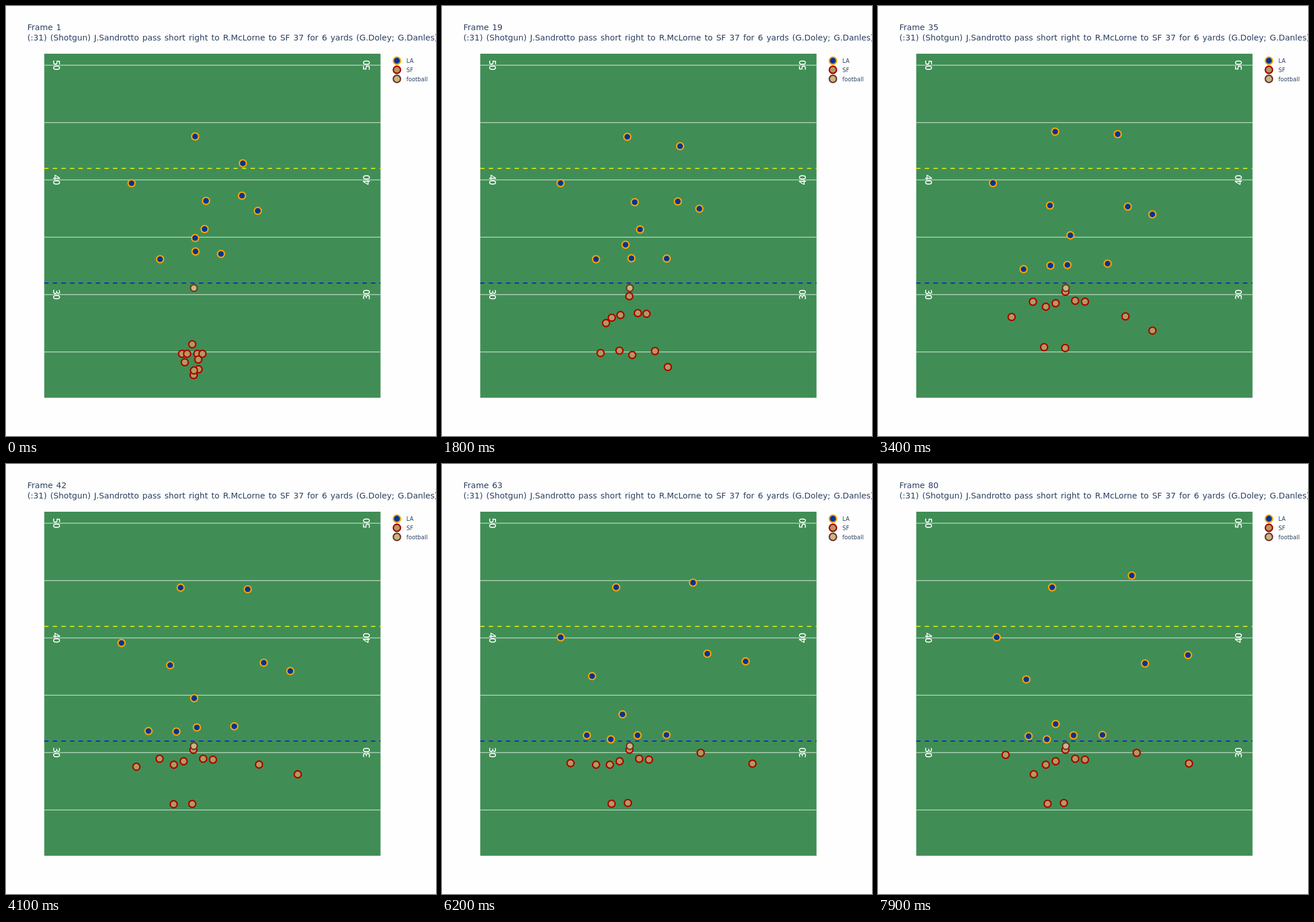
Animation of 748x748 px, one loop 8000 ms. Source, as an HTML page with a canvas:

```html
<!DOCTYPE html>
<html lang="en">
<head>
<meta charset="utf-8">
<title>Play tracking</title>
<style>
  html, body { margin: 0; width: 100%; height: 100%; overflow: hidden; background: #fefefe; }
  canvas { display: block; width: 748px; height: 748px; }
</style>
</head>
<body>
<canvas id="stage"></canvas>
<script>
const SIZE = 748, STEP = 100, STEPS = 80;
const FIELD = { left: 66.5, right: 651.5, top: 83, bottom: 681.5, yard: 19.95 };
const INK = '#2a3f5f';
const SANS = 'Verdana, "DejaVu Sans", sans-serif';
const PLAY = '(:31) (Shotgun) J.Sandrotto pass short right to R.McLorne to SF 37 for 6 yards (G.Doley; G.Danles)';
const TEAMS = {
  LA: { fill: '#003594', line: '#ffa300' },
  SF: { fill: '#b3995d', line: '#aa0000' },
  football: { fill: '#cbb67c', line: '#663831' }
};

const canvas = document.getElementById('stage');
const ctx = canvas.getContext('2d');
const ratio = window.devicePixelRatio || 1;
canvas.width = canvas.height = Math.round(SIZE * ratio);

// Smooth curve through [time, value] pairs: sets off at full speed,
// turns without overshoot, comes to rest at the last one.
function glide(keys) {
  const last = keys.length - 1;
  const rate = i => (keys[i + 1][1] - keys[i][1]) / (keys[i + 1][0] - keys[i][0]);
  const slope = i => {
    if (i === last) return 0;
    if (i === 0) return rate(0);
    const a = rate(i - 1), b = rate(i);
    return a * b > 0 ? 2 * a * b / (a + b) : 0;
  };
  return time => {
    const t = Math.min(Math.max(time, keys[0][0]), keys[last][0]);
    let i = 0;
    while (i < last - 1 && t > keys[i + 1][0]) i++;
    const [t0, a] = keys[i], [t1, b] = keys[i + 1];
    const h = t1 - t0, u = (t - t0) / h, w = 1 - u;
    return a * w * w * (1 + 2 * u) + b * u * u * (3 - 2 * u)
      + h * u * w * (slope(i) * w - slope(i + 1) * u);
  };
}

const players = [];

// Way points are [seconds, x, y]
function run(team, ...points) {
  players.push({
    team,
    x: glide(points.map(([t, x]) => [t, x])),
    y: glide(points.map(([t, , y]) => [t, y]))
  });
}

// Safeties and corners
run('LA', [0, 329, 227], [1.5, 324, 228], [4.5, 303, 214.5]);
run('LA', [0, 412, 273.7], [3.4, 417, 223], [6.2, 436.7, 206.5], [7.9, 441.5, 194]);
run('LA', [0, 218.5, 308.3], [3.4, 200, 308], [4.9, 203, 315.5], [6.2, 206.5, 301.5]);
run('LA', [1.2, 348, 339], [4.9, 274, 354], [7, 258, 374.7]);
run('LA', [0, 410.5, 330], [1.8, 410.3, 340], [3.4, 434.5, 349], [4.9, 459.5, 339], [6.2, 461.5, 330], [7.9, 464.5, 347]);
run('LA', [0, 438, 356.3], [1.8, 447.7, 352.7], [3.4, 477.3, 362.5], [4.9, 511.7, 355], [7.9, 539.3, 332.3]);
// Linebacker and rushers
run('LA', [0, 345.5, 388], [2, 344.3, 389], [4.9, 321, 417], [7.9, 309, 452.3]);
run('LA', [0, 329, 403.7], [1.8, 319.3, 415.3], [3.4, 300, 451.5], [5.2, 293.7, 479]);
run('LA', [0, 329.7, 427], [3.4, 329.5, 450.5], [5.6, 340.2, 472]);
run('LA', [0, 374, 431.3], [3.4, 399.5, 448.2], [5.5, 390.5, 471.3]);
run('LA', [1.8, 268, 440.5], [4.9, 245.2, 469], [7.9, 262, 473.5]);

// Five linemen fan out from the huddle, the centre a step ahead
for (let i = -2; i <= 2; i++) {
  const ahead = i === 0 ? 16.5 : 0;
  run('SF',
    [0, 324 + 8.9 * i, 605 - ahead],
    [ahead ? 2.3 : 2.9, 326 + 17 * i, 513.7 - 2.2 * i + 1.25 * i * i - ahead]);
}
// Tight end
run('SF', [0, 311, 619.8], [3.4, 269.5, 514.5], [4.9, 266, 512], [7.9, 271, 539.7]);
// Receivers
run('SF', [0, 326.5, 642], [0.8, 336, 632], [3.4, 430.5, 540], [5.5, 450, 502.5]);
run('SF', [0, 326.5, 642], [0.8, 349, 645], [4.9, 527.8, 525.5], [6.6, 541, 521]);
// Running back, slot and passer
run('SF', [0, 335, 632], [1.8, 308.7, 599.5], [3.4, 289, 593.5], [4.9, 295, 591]);
run('SF', [0, 327, 634], [0.8, 308.5, 631], [3.4, 232.5, 541], [4.9, 224, 518.5], [6.4, 223.5, 520.5], [7.9, 222, 506]);
run('SF', [0.7, 334.5, 615], [4.9, 323.3, 589.7]);

function dot(team, x, y, r = 6.1) {
  const { fill, line } = TEAMS[team];
  ctx.beginPath();
  ctx.arc(x, y, r, 0, Math.PI * 2);
  ctx.fillStyle = fill;
  ctx.fill();
  ctx.lineWidth = 2.4;
  ctx.strokeStyle = line;
  ctx.stroke();
}

const yardY = yard => FIELD.top + (51 - yard) * FIELD.yard;

function yardLine(yard, color, width, dash = []) {
  ctx.setLineDash(dash);
  ctx.lineWidth = width;
  ctx.strokeStyle = color;
  ctx.beginPath();
  ctx.moveTo(FIELD.left, yardY(yard));
  ctx.lineTo(FIELD.right, yardY(yard));
  ctx.stroke();
  ctx.setLineDash([]);
}

function text(str, x, y, size) {
  ctx.font = size + 'px ' + SANS;
  ctx.fillStyle = INK;
  ctx.fillText(str, x, y);
}

function yardMark(yard, x, turn) {
  ctx.save();
  ctx.translate(x, yardY(yard));
  ctx.rotate(turn * Math.PI / 2);
  ctx.textAlign = 'center';
  ctx.font = '600 15.5px "Open Sans", sans-serif';
  ctx.fillStyle = '#fff';
  ctx.fillText(yard, 0, 5.5);
  ctx.restore();
}

function drawField() {
  ctx.fillStyle = '#408e55';
  ctx.fillRect(FIELD.left, FIELD.top, FIELD.right - FIELD.left, FIELD.bottom - FIELD.top);
  for (let yard = 25; yard <= 50; yard += 5) yardLine(yard, 'rgba(255,255,255,0.6)', 1.5);
  const dash = [7.48, 7.48];
  yardLine(31, '#0000ff', 1.7, dash);
  yardLine(41, '#ffff00', 1.7, dash);
}

function drawLegend() {
  Object.keys(TEAMS).forEach((team, i) => {
    const y = 95.2 + i * 15.8;
    dot(team, 680, y, 6.3);
    text(team, 696.5, y + 3.7, 9.8);
  });
}

function draw(step) {
  const time = step * STEP / 1000;
  ctx.setTransform(ratio, 0, 0, ratio, 0, 0);
  ctx.fillStyle = '#fefefe';
  ctx.fillRect(0, 0, SIZE, SIZE);
  drawField();
  for (const p of players) dot(p.team, p.x(time), p.y(time));
  dot('football', 326.8, 490.6, 5.9);
  for (let yard = 30; yard <= 50; yard += 10) {
    yardMark(yard, 87, 1);
    yardMark(yard, 627, -1);
  }
  drawLegend();
  ctx.wordSpacing = '1.5px';
  text('Frame ' + (step + 1), 37.3, 41.5, 14.15);
  text(PLAY, 37.3, 60, 14.15);
  ctx.wordSpacing = '0px';
}

const start = performance.now();
function tick(now) {
  draw(Math.floor(Math.max(0, now - start) / STEP) % STEPS);
  requestAnimationFrame(tick);
}
draw(0);
requestAnimationFrame(tick);
</script>
</body>
</html>
```
